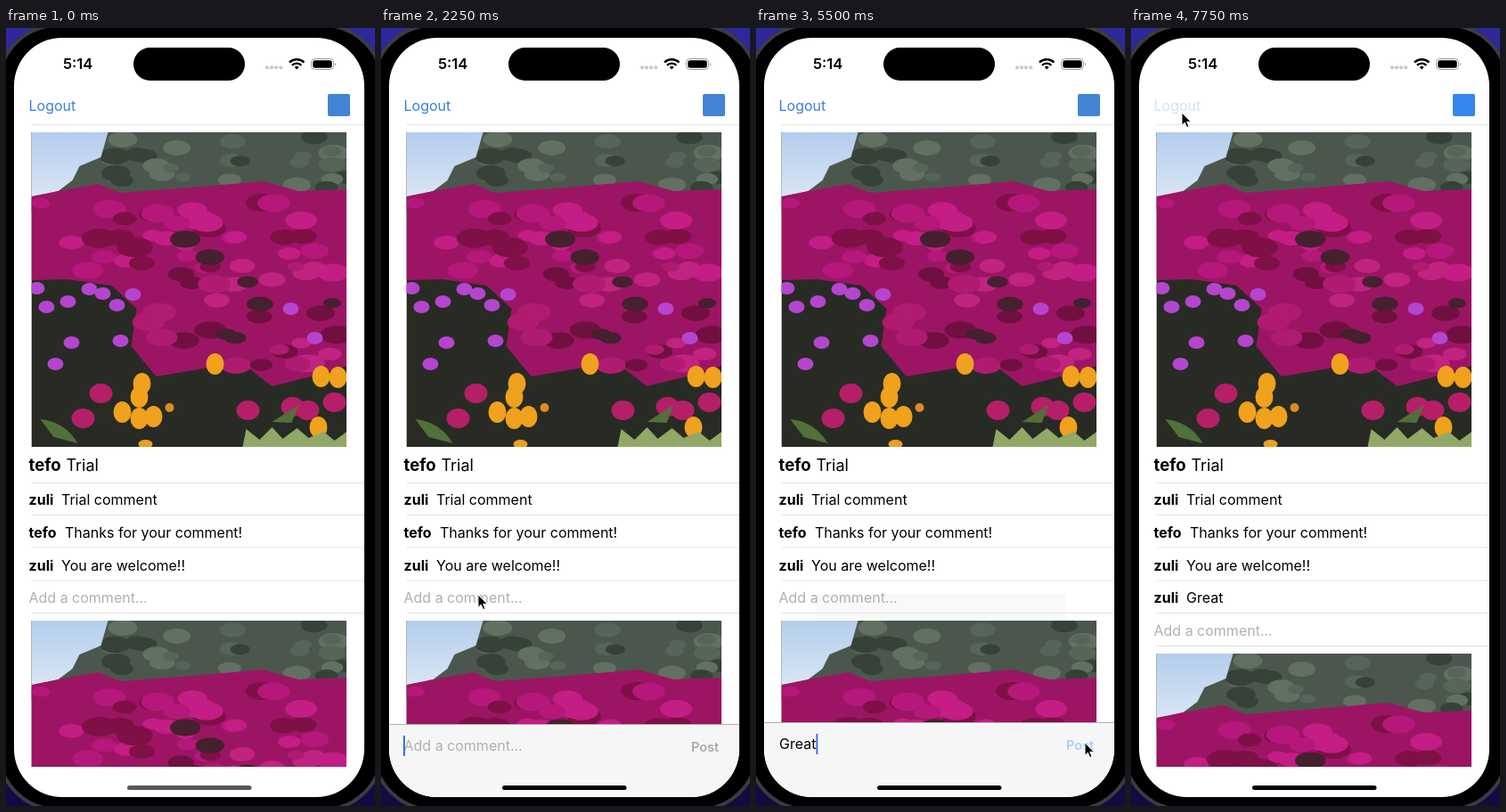
An HTML page for the animation above (8000 ms loop, 414 px wide and 873 px high).

```html
<!DOCTYPE html>
<html lang="en">
<head>
<meta charset="utf-8">
<title>Photo feed</title>
<style>
  html, body { margin: 0; width: 100%; height: 100%; overflow: hidden; background: #100d45; }
  svg { display: block; width: 414px; height: 873px; }
  text { font: 16px Inter, "Open Sans", sans-serif; white-space: pre; }
  .b { font-weight: 700; }
  .hint { fill: #b0b0b3; }
  .title { font-size: 18.6px; }
  .line { stroke: #e2e2e4; stroke-width: 1; }
</style>
</head>
<body>
<svg viewBox="0 0 414 873">
  <defs>
    <linearGradient id="desk" x2="0" y2="1">
      <stop offset="0" stop-color="#2e289c"/><stop offset="1" stop-color="#100c40"/>
    </linearGradient>
    <linearGradient id="sky" x2="0" y2="1">
      <stop offset="0" stop-color="#b3cdec"/><stop offset="1" stop-color="#dbe6f5"/>
    </linearGradient>
    <clipPath id="screen"><rect x="9" y="11" width="393" height="852" rx="54"/></clipPath>
    <clipPath id="feed"><rect x="9" y="109" width="393" height="720"/></clipPath>
    <clipPath id="square"><rect width="353.5" height="353"/></clipPath>
    <g id="photo" clip-path="url(#square)"></g>
  </defs>

  <rect width="414" height="873" fill="url(#desk)"/>
  <rect x="-8" y="-3" width="430" height="880" rx="66" fill="#000" stroke="#3b3b40" stroke-width="4"/>
  <rect x="9" y="11" width="393" height="852" rx="54" fill="#fff"/>

  <g clip-path="url(#screen)">
    <text class="b" x="64" y="46" style="font-size:16.5px;font-weight:600">5:14</text>
    <rect x="143" y="22" width="125" height="37" rx="18.5"/>
    <g fill="#c9c9cc">
      <circle cx="293" cy="44.3" r="2.1"/><circle cx="298" cy="44.3" r="2.1"/>
      <circle cx="303" cy="44.3" r="2.1"/><circle cx="308.3" cy="44.3" r="2.1"/>
    </g>
    <g fill="none" stroke="#000" stroke-width="2.4">
      <path d="M318 38.6a11.6 11.6 0 0 1 16.4 0M321 41.8a7.3 7.3 0 0 1 10.4 0"/>
      <path d="M326.2 46.4l-2.4-2.5a3.4 3.4 0 0 1 4.8 0z" fill="#000" stroke="none"/>
    </g>
    <rect x="342.5" y="34.5" width="25" height="12" rx="4" fill="none" stroke="#9a9a9c"/>
    <rect x="344.3" y="36.2" width="21.4" height="8.6" rx="2.5"/>
    <path d="M369 38.7q2 2 0 4z" fill="#9a9a9c"/>

    <text id="logout" x="25.5" y="93">Logout</text>
    <rect id="badge" x="361" y="74" width="25" height="25" rx="2"/>
    <path class="line" d="M29 108.5H402"/>

    <g clip-path="url(#feed)">
      <use href="#photo" x="28.5" y="117"/>
      <text class="title" y="497"><tspan class="b" x="25.5">tefo</tspan><tspan x="67.5" font-size="18">Trial</tspan></text>
      <rect id="ghost" x="67" y="635" width="281" height="28" fill="#f9f9f9"/>
      <g id="rows"></g>
      <g id="tail">
        <text class="hint" x="25.5" y="645">Add a comment...</text>
        <path class="line" d="M29 656.5H402"/>
        <use href="#photo" x="28.5" y="665"/>
      </g>
    </g>

    <g id="bar">
      <rect x="9" width="393" height="100" fill="#f6f6f6"/>
      <path d="M9 .5H402" stroke="#b2b2b4"/>
      <text id="hint" class="hint" x="25.5" y="30">Add a comment...</text>
      <text id="typed" x="26" y="30"></text>
      <rect id="caret" y="13" width="2" height="23" fill="#3f6fe0"/>
      <text id="post" x="348" y="31" style="font-size:14.5px;font-weight:600">Post</text>
    </g>
    <rect id="home" x="136" y="850" width="139.5" height="5" rx="2.5"/>
  </g>

  <path id="cursor" d="M0 0V14.3L3.3 11.2 5.6 16.6 8 15.5 5.7 10.3H10.3z" fill="#000" stroke="#fff" stroke-width="1"/>
</svg>
<script>
const LOOP = 8000, STEP = 250;
const $ = id => document.getElementById(id);

// Flat flower-bed picture
let seed = 11;
const rnd = (a, b) => {
  seed = (seed * 16807) % 2147483647;
  return a + (b - a) * seed / 2147483647;
};
const shape = (d, fill) => `<path d="${d}" fill="${fill}"/>`;
const blob = (x, y, rx, ry, fill) =>
  `<ellipse cx="${x}" cy="${y}" rx="${rx}" ry="${ry}" fill="${fill}"/>`;
const scatter = (n, x0, x1, y0, y1, r, fills) =>
  Array.from({ length: n }, (_, i) => {
    const x = rnd(x0, x1), y = rnd(y0, y1), s = rnd(r * .6, r * 1.2);
    return blob(x.toFixed(1), y.toFixed(1), s.toFixed(1), (s * .55).toFixed(1), fills[i % fills.length]);
  }).join('');
const spots = (list, rx, ry, fill) => list.map(([x, y]) => blob(x, y, rx, ry, fill)).join('');

$('photo').innerHTML = [
  shape('M0 0H354V353H0z', '#282b24'),
  shape('M0 0H354V90H0z', '#4b574c'),
  scatter(26, 90, 350, 5, 62, 15, ['#627062', '#364238', '#56645a']),
  shape('M0 0H86L78 28 54 38 46 54 30 66 0 74z', 'url(#sky)'),
  shape('M0 72L30 66 75 58 100 68 180 62 260 55 300 66 354 64V262L310 275 270 285 235 258 140 274 112 240 118 198 90 172 40 165 0 166z', '#9c1564'),
  scatter(34, 10, 345, 78, 158, 17, ['#c41d86', '#7e1046', '#b5187a']),
  scatter(26, 125, 345, 150, 262, 16, ['#c02380', '#701040', '#b01b72']),
  scatter(7, 150, 345, 115, 240, 15, ['#45202f']),
  spots([[58, 321], [78, 293], [243, 312], [293, 308], [340, 303], [310, 312]], 13, 11, '#b51f68'),
  spots([[6, 175], [17, 196], [41, 190], [65, 176], [80, 181], [96, 194], [114, 182], [45, 236], [100, 234], [27, 260], [291, 198], [318, 231]], 9, 7, '#b545cf'),
  spots([[124, 282], [121, 297], [102, 314], [121, 321], [137, 319], [206, 260], [325, 274], [344, 275], [322, 331]], 10, 12, '#f0a11d'),
  blob(128, 350, 8, 5, '#eba024') + blob(155, 309, 5, 5, '#e08a25'),
  shape('M10 322Q38 325 52 349L25 342zM270 325L300 306 292 326z', '#52703a'),
  shape('M237 353L241 333 256 345 270 331 282 344 298 332 311 343 328 336 340 346 354 336V353z', '#91a867')
].join('');

const row = (name, x, text, y) =>
  `<text y="${y}"><tspan class="b" x="25.5">${name}</tspan><tspan x="${x}">${text}</tspan></text>` +
  `<path class="line" d="M29 ${y + 11.5}H402"/>`;
$('rows').innerHTML =
  '<path class="line" d="M29 510.5H402"/>' +
  row('zuli', 62, 'Trial comment', 535) +
  row('tefo', 66, 'Thanks for your comment!', 571.5) +
  row('zuli', 62, 'You are welcome!!', 608.5) +
  `<g id="fresh">${row('zuli', 62, 'Great', 645)}</g>`;

// [time, x, y]
const path = [
  [500, 160, 815], [1000, 50, 450], [1500, 109, 636], [4500, 109, 636],
  [5250, 369, 802], [6000, 369, 802], [6500, 361, 797], [6750, 310, 660],
  [7000, 190, 398], [7250, 95, 180], [7500, 57, 95], [LOOP, 57, 95]
];
// [time, value]
const barTop = [[0, 873], [2000, 836], [2250, 781], [2500, 779], [5750, 846], [6000, 873]];
const words = [[0, ''], [3250, 'G'], [3500, 'Gr'], [3750, 'Gre'], [4000, 'Grea'], [4250, 'Great'], [5750, '']];
const at = (table, t) => table.filter(k => k[0] <= t).pop()[1];
const show = (id, on) => $(id).setAttribute('visibility', on ? 'visible' : 'hidden');
const move = (id, x, y) => $(id).setAttribute('transform', `translate(${x} ${y})`);
const paint = (id, fill) => $(id).setAttribute('fill', fill);

function pointer(t) {
  const i = path.findIndex(k => k[0] > t), [a, ax, ay] = path[i - 1], [b, bx, by] = path[i];
  const p = (t - a) / (b - a);
  return [ax + (bx - ax) * p, ay + (by - ay) * p];
}

let last = -1;
function draw(t) {
  if (t === last) return;
  last = t;
  const posted = t >= 5750, word = at(words, t), late = t >= 7250;
  show('cursor', t >= 500);
  if (t >= 500) move('cursor', ...pointer(t));

  show('fresh', posted);
  move('tail', 0, posted ? 37 : 0);
  show('ghost', t >= 5000 && !posted);

  const top = at(barTop, t);
  show('bar', top < 873);
  move('bar', 0, top);
  $('typed').textContent = word;
  show('hint', !word && top < 873);
  const width = word ? $('typed').getComputedTextLength() : -1;
  $('caret').setAttribute('x', 26 + width);
  show('caret', top < 840 && t !== 3000);
  paint('post', !word ? '#a9a9ac' : t >= 5500 ? '#a9cdf6' : '#347fee');

  paint('logout', t >= 7750 ? '#cfe2fb' : '#3b7fdd');
  paint('badge', late ? '#3586ee' : '#4384d6');
  paint('home', t < 2000 ? '#58585a' : '#000');
}

const start = performance.now();
function tick() {
  const t = (performance.now() - start) % LOOP;
  draw(Math.floor(t / STEP) * STEP);
  requestAnimationFrame(tick);
}
draw(0);
requestAnimationFrame(tick);
</script>
</body>
</html>
```
